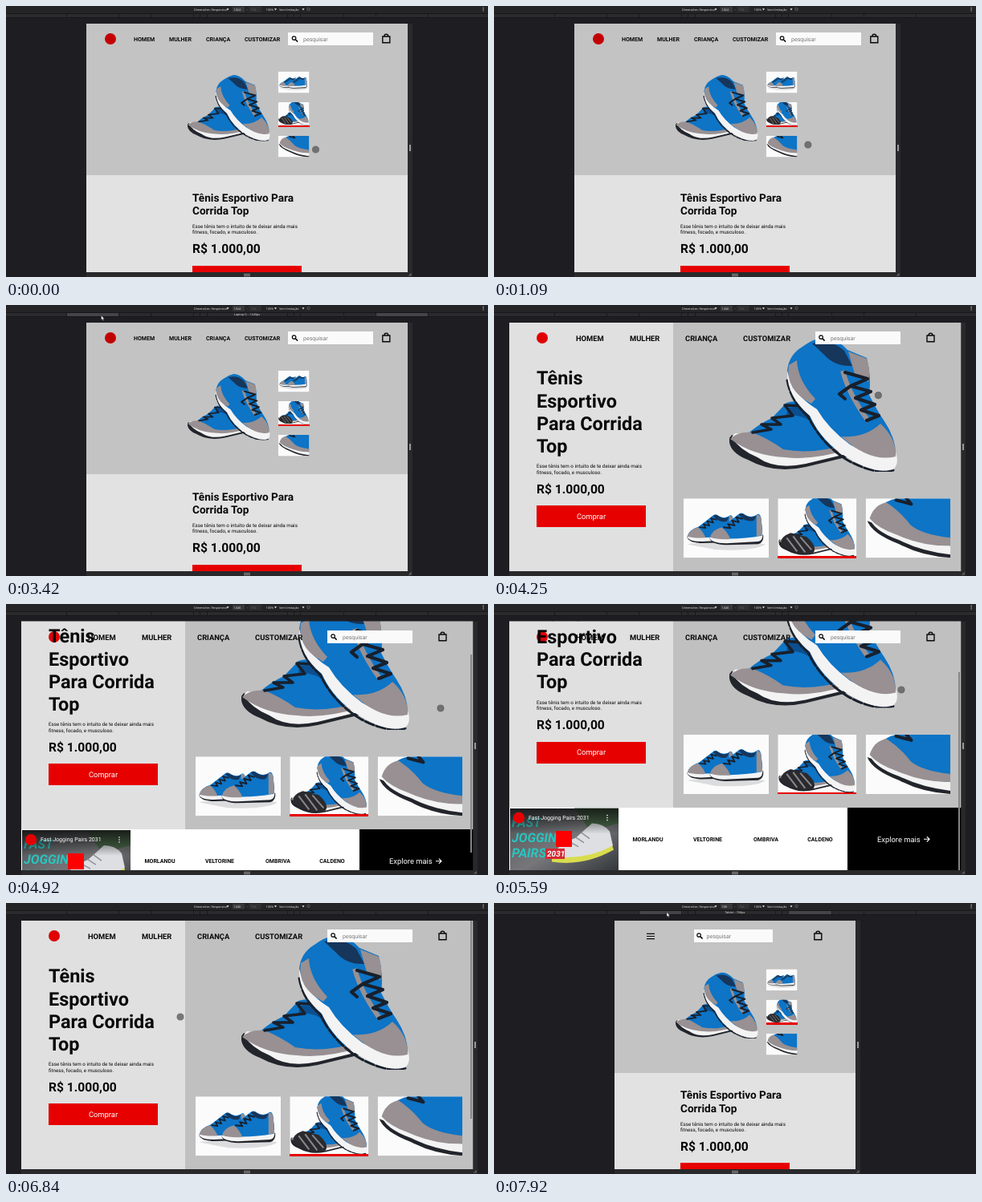
These frames come from a looping animation (600 px wide and 338 px high, 8000 ms). An HTML page:

```html
<!DOCTYPE html>
<html lang="pt">
<head>
<meta charset="utf-8">
<title>Loja responsiva</title>
<style>
  html, body { margin: 0; width: 100%; height: 100%; overflow: hidden; background: #1e1e22; }
  svg { display: block; }
  #stage { width: 100vw; height: 100vh; }
  rect { shape-rendering: crispEdges; }
  text { font-family: Roboto, sans-serif; fill: #080808; white-space: pre; text-rendering: geometricPrecision; }
  .bold { font-weight: 700; }
  .tool { font: 3.75px "Open Sans", sans-serif; fill: #e8e8ea; }
  .dim { fill: #66666a; }
  .white { fill: #fff; }
  .teal { fill: #28c5c0; font-style: italic; }
  .hint { fill: #777; }
  .line { fill: none; stroke: #080808; }
  .lace { fill: none; stroke: #18202c; stroke-linecap: round; stroke-linejoin: round; }
  .blue { fill: #0d74c6; }
  .grey { fill: #989092; }
  .sole { fill: #f3f3f4; }
  .logo { fill: #e60000; mix-blend-mode: darken; }
</style>
</head>
<body>
<svg id="stage" viewBox="0 0 600 338" preserveAspectRatio="none">
  <defs>
    <clipPath id="view"><rect x="18.75" y="21.5" width="562.5" height="310.5"/></clipPath>
    <linearGradient id="shade" x2="0" y2="1">
      <stop stop-color="#111" stop-opacity=".85"/><stop offset="1" stop-color="#111" stop-opacity="0"/>
    </linearGradient>
    <linearGradient id="road" x2="1" y2="1">
      <stop stop-color="#4b5053"/><stop offset=".55" stop-color="#77777a"/><stop offset="1" stop-color="#34383b"/>
    </linearGradient>

    <symbol id="pair" viewBox="293 40 210 168">
      <path fill="#22252b" d="M293 166Q291 183 316 193Q348 211 388 202L446 188V180L380 188Q330 186 296 162Z"/>
      <path class="sole" d="M296 165Q306 181 328 190Q350 206 388 198L446 184L440 168L300 160Z"/>
      <path class="blue" d="M314 162Q330 148 346 141L364 122Q378 117 394 126L446 172Q412 186 375 188Q335 184 314 162Z"/>
      <path fill="#0b4f91" d="M366 128Q388 124 408 142L398 148Q384 136 364 137Z"/>
      <path class="grey" d="M294 167Q304 157 322 159Q342 167 360 180Q396 187 438 174L441 180Q398 194 362 190Q322 188 294 167Z"/>
      <path class="lace" stroke-width="3.600" d="M322 159L345 155L333 149L357 149L346 141L372 138L362 125L384 126"/>
      <path class="lace" stroke-width="3" stroke-dasharray="12 3" d="M365 94Q370 121 391 139Q408 174 441 194Q474 212 497 206"/>
      <path class="sole" d="M365 82Q364 114 393 138Q408 171 441 191Q475 212 497 205Q505 198 500 184L430 155L400 100Z"/>
      <path class="blue" d="M365 82Q367 62 384 52Q396 43 410 40Q425 40 440 56L464 66Q470 90 467 112Q477 132 486 145Q500 166 500 186Q470 191 443 174Q416 154 402 130Q372 112 365 82Z"/>
      <path fill="#16365c" d="M396 48Q420 42 436 57L446 76Q424 77 411 62Z"/>
      <path class="grey" d="M441 58L464 67Q469 82 466 96L449 86ZM367 75L377 69Q378 94 400 117L395 123Q362 106 367 75Z"/>
      <path class="grey" d="M432 164Q462 166 481 148Q501 166 500 189Q468 197 432 164Z"/>
      <path fill="none" stroke="#989092" stroke-width="6" d="M434 82Q442 112 466 145"/>
      <path class="lace" stroke-width="4.200" d="M437 84L465 92L444 101L469 108L450 116L474 124L457 131L479 138L464 144M444 101L430 111L437 117"/>
    </symbol>

    <g id="side">
      <path fill="#22252b" d="M0 31Q2 40 20 40L58 39Q65 37 64 28Z"/>
      <path class="sole" d="M0 31Q2 38 20 38L58 36Q64 35 63 26Z"/>
      <path class="blue" d="M1 31Q2 23 16 18L34 4Q38 0 42 4Q50 9 58 3Q62 4 62 14Q64 26 62 29Q30 35 1 31Z"/>
      <path class="grey" d="M1 31Q3 22 15 19Q22 25 25 33Q10 34 1 31ZM56 4Q62 3 62 14L63 28L56 30Z"/>
      <path fill="#16365c" d="M35 4Q39 1 43 5Q50 9 56 5L53 11Q43 14 35 4Z"/>
      <path class="lace" stroke-width="1.8" d="M17 19L25 20L22 15L30 17L27 11L35 13L32 7L39 9"/>
    </g>
    <symbol id="thumb0" viewBox="0 0 106 74" preserveAspectRatio="none">
      <path fill="#fbfbfb" d="M0 0H106V74H0Z"/>
      <path fill="#dcdcde" d="M4 57Q50 50 102 57Q90 66 40 64Z"/>
      <use href="#side" transform="translate(4 18)scale(.94)"/>
      <use href="#side" transform="translate(32 16)scale(1.05)"/>
    </symbol>
    <symbol id="thumb1" viewBox="0 0 98 72" preserveAspectRatio="none">
      <path fill="#fbfbfb" d="M0 0H98V72H0Z"/>
      <use href="#pair" x="1" y="-5" width="96" height="77"/>
      <path fill="#2a2a2e" d="M4 58Q2 48 16 43L36 48Q50 60 44 68Q25 73 4 58Z"/>
      <path fill="none" stroke="#8b8789" stroke-width="2" d="M11 49L24 66M19 47L34 67M28 48L42 64"/>
    </symbol>
    <symbol id="thumb2" viewBox="0 0 106 74" preserveAspectRatio="none">
      <path fill="#fbfbfb" d="M0 0H106V74H0Z"/>
      <path fill="#22252b" d="M2 28Q8 44 42 57Q70 72 106 74V66Z"/>
      <path class="sole" d="M4 22Q8 40 42 52Q70 66 106 70V52Z"/>
      <path class="blue" d="M10 20Q22 2 40 0H106V59Q72 58 42 44Q18 34 10 20Z"/>
      <path class="grey" d="M5 25Q10 8 26 5Q44 17 56 33Q70 45 106 49V59Q72 60 38 45Q15 37 5 25Z"/>
      <path class="lace" stroke-width="4" d="M38 2L57 7L51 0"/>
    </symbol>

    <g id="lens" class="line" stroke-width="1.2"><circle cx="-.9" cy="-.9" r="2.3"/><path d="M.8 .8L3.6 3.6" stroke-width="1.5"/></g>
    <path id="bag" class="line" stroke-width="1.4" d="M-4.5 -3H4.5V4.7H-4.5ZM-2.3 -3V-4Q-2.3 -5.8 0 -5.8T2.3 -4V-3"/>
  </defs>

  <path fill="#1e1e22" d="M0 0H600V338H0Z"/>
  <path fill="#242427" d="M0 0H600V9H0Z"/>
  <g class="tool">
    <text class="tool" x="234" y="5.6">Dimensões: Responsivo</text>
    <path d="M274.5 3.2h3l-1.5 2.2zM334 3.2h3l-1.5 2.2zM368.5 3.2h3l-1.5 2.2z"/>
    <path d="M282 .8h15v6.6h-15z" fill="#38383b"/>
    <path d="M302.5 .8h15v6.6h-15z" fill="#303033"/>
    <text class="tool" id="size" x="283.5" y="5.6"></text>
    <text class="tool dim" x="299" y="5.6">×</text>
    <text class="tool dim" x="305" y="5.6">704</text>
    <text class="tool" x="323.5" y="5.6">100%</text>
    <text class="tool" x="340" y="5.6">Sem limitação</text>
    <circle cx="376.5" cy="4" r="1.7" fill="none" stroke="#777" stroke-width=".7"/>
    <path d="M593.6 1.8h1v1h-1zm0 1.8h1v1h-1zm0 1.8h1v1h-1z"/>
  </g>
  <g id="ruler"></g>
  <text class="tool" id="label" x="300" y="13.2" text-anchor="middle"></text>
  <g id="frame"></g>
  <g id="pages"></g>
  <circle id="touch" r="4.1" fill="#555" fill-opacity=".75" stroke="#444" stroke-opacity=".6" stroke-width=".8"/>
  <path id="arrow" d="M0 0V5.6L1.3 4.5L2.2 6.5L3.2 6L2.3 4.2H4Z" fill="#fff" stroke="#111" stroke-width=".4"/>
</svg>
<script>
const $ = id => document.getElementById(id);
const PX = 0.390625, RULER = 0.15625, LOOP = 8000, STEPS = 96;
const red = '#e60000';

const text = (x, y, size, str, cls = '', more = '') =>
  `<text x="${x}" y="${y}" font-size="${size}" class="${cls}" ${more}>${str}</text>`;
const rect = (x, y, w, h, fill) =>
  `<rect x="${x}" y="${y}" width="${w}" height="${h}" fill="${fill}"/>`;
const use = (id, x, y, w, h) =>
  `<use href="#${id}" x="${x}" y="${y}" width="${w}" height="${h}"/>`;
const put = (id, x, y) => `<use href="#${id}" transform="translate(${x} ${y})"/>`;
const logo = (x, y) => `<circle class="logo" cx="${x}" cy="${y}" r="7"/>`;

const nav = (xs, y, size) => ['HOMEM', 'MULHER', 'CRIANÇA', 'CUSTOMIZAR']
  .map((word, i) => text(xs[i], y, size, word, 'bold')).join('');
const search = (x, w, iconX, hintX) =>
  rect(x, 33, w, 16.4, '#fafafa') + put('lens', iconX, 41) + text(hintX, 43.9, 7.03, 'pesquisar', 'hint');

const about = (x, y) =>
  text(x, y, 6.25, 'Esse tênis tem o intuito de te deixar ainda mais') +
  text(x, y + 7.5, 6.25, 'fitness, focado, e musculoso.') +
  text(x, y + 31.6, 15.6, 'R$ 1.000,00', 'bold');

// Stacked layout shared by the two narrower widths.
function narrow(px, header, dy) {
  const w = px * PX, x = 300 - w / 2, split = 211 + dy;
  return rect(x, 21.5, w, 310.5, '#e2e2e2') + rect(x, 21.5, w, split - 21.5, '#c3c3c3') + header +
    use('pair', 226, 86 + dy / 2, 103, 82.5) +
    use('thumb0', 338.7, 81.8 + dy, 38.8, 26.6) +
    use('thumb1', 338.7, 120 + dy, 38.8, 28.7) + rect(338.7, 148.6 + dy, 38.8, 2.4, red) +
    use('thumb2', 338.7, 162 + dy, 38.8, 26.6) +
    text(232, 243.6 + dy, 13.6, 'Tênis Esportivo Para', 'bold') +
    text(232, 259.7 + dy, 13.6, 'Corrida Top', 'bold') +
    about(232, 276.7 + dy) +
    rect(232, 323.5 + dy, 136, 8.5 - dy, red);
}

function video() {
  const words = ['FAST', 'JOGGING', 'PAIRS']
    .map((word, i) => text(22, 356 + i * 19, 16, word, 'bold teal')).join('');
  return rect(20, 333, 135, 77, 'url(#road)') +
    '<path fill="#476847" d="M100 333H155V352L120 362Z"/>' + words +
    '<path fill="#d9dc4e" d="M72 392Q108 399 146 377L149 385Q112 406 72 400Z"/>' +
    '<path fill="#dedfe2" d="M72 393Q80 378 102 370L122 352Q136 352 144 362L148 380Q112 399 72 393Z"/>' +
    '<path fill="none" stroke="#8d9298" stroke-width="1.5" d="M94 375L105 381M101 369L112 376M108 363L119 371"/>' +
    rect(64, 383, 24, 13, '#d42a35') + text(66, 393, 10, '2031', 'bold white', 'font-style="italic"') +
    rect(20, 333, 135, 32, 'url(#shade)') + `<circle cx="31" cy="345" r="7" fill="${red}"/>` +
    text(43, 347.4, 7.03, 'Fast Jogging Pairs 2031', 'white') +
    [342, 345, 348].map(y => `<circle cx="141" cy="${y}" r=".8" fill="#fff"/>`).join('') +
    rect(77, 361.5, 20, 20, '#f00');
}

function wide() {
  const title = ['Tênis', 'Esportivo', 'Para Corrida', 'Top']
    .map((line, i) => text(53, 99.4 + i * 28.12, 23.44, line, 'bold')).join('');
  const links = [['MORLANDU', 191.5], ['VELTORINE', 266], ['OMBRIVA', 338.5], ['CALDENO', 406]]
    .map(([name, x]) => text(x, 374, 7.03, name, 'bold', 'text-anchor="middle"')).join('');
  return `<g clip-path="url(#view)"><g id="scroll">` +
    rect(18.75, 21.5, 204.5, 310.5, '#e0e0e0') + rect(223, 21.5, 358.5, 310.5, '#c0c0c0') +
    use('pair', 293, 40, 210, 168) + title + about(53, 203.1) +
    rect(53, 250, 136, 27, red) + text(121, 266.8, 9.375, 'Comprar', 'white', 'text-anchor="middle"') +
    use('thumb0', 236, 241.3, 106, 74) +
    use('thumb1', 353.3, 241.3, 98, 72) + rect(353.3, 313.2, 98, 2.4, red) +
    use('thumb2', 462.7, 241.3, 105.5, 74) +
    rect(18.75, 332, 562.5, 79, '#fff') + video() + links +
    rect(439.5, 332, 142, 79, '#000') + text(477, 375, 9.375, 'Explore mais', 'white') +
    '<path d="M535 371.7H542M538.8 368.5L542 371.7L538.8 374.9" fill="none" stroke="#fff" stroke-width="1.1"/>' +
    `</g>${logo(60, 41)}` + nav([102, 169, 238, 310], 44.9, 9.375) +
    search(399.5, 106.5, 408, 419) + put('bag', 543.5, 41) +
    '<rect id="thumb" x="578.4" width="1.7" height="247" fill="#858585"/></g>';
}

const burger = '<path class="line" stroke-width="1.2" d="M190 38.3H200M190 41.5H200M190 44.7H200"/>';
const pages = {
  1024: narrow(1024, logo(130, 41) + nav([159, 203, 249, 297], 43.9, 7.03) +
    search(351, 106, 359.5, 370) + put('bag', 473.3, 41), 0),
  1440: wide(),
  768: narrow(768, burger + search(249, 98, 256, 264.5) + put('bag', 403.3, 41), 0.8)
};
$('pages').innerHTML = Object.entries(pages)
  .map(([px, body]) => `<g id="page${px}">${body}</g>`).join('');

const presets = [[320, 'Celular P'], [375, 'Celular M'], [425, 'Celular G'], [768, 'Tablet'],
  [1024, 'Laptop'], [1440, 'Laptop G'], [2560, '4K']];
// Widest first, so each narrower preset lies on top.
$('ruler').innerHTML = presets.slice().reverse().map(([px]) => {
  const half = px * RULER;
  return `<rect id="bar${px}" x="${300 - half}" y="9.5" width="${half * 2}" height="4.5" stroke="#18181a" stroke-width=".9"/>`;
}).join('');

function drawFrame(px) {
  const w = px * PX, x = 300 - w / 2, r = x + w;
  $('frame').innerHTML = rect(r, 21.5, 6, 310.5, '#29292c') + rect(x, 332, w + 6, 6, '#29292c') +
    rect(r + 1.8, 172.5, 1, 8, '#999') + rect(r + 3.2, 172.5, 1, 8, '#999') +
    rect(296, 334, 8, 1, '#999') + rect(296, 335.5, 8, 1, '#999') +
    `<path d="M${r + 1.5} 336.5l3-3M${r + 3.2} 336.5l1.5-1.5" stroke="#aaa" stroke-width=".7"/>`;
}

const pointerPath = [[0, 385.5, 179], [920, 385.5, 179], [1600, 422.5, 138.5], [2600, 422.5, 138.5],
  [3150, 118.5, 13], [3720, 118.5, 13], [4420, 541, 130], [4920, 541, 130], [5500, 507, 107],
  [6000, 507, 107], [6750, 217, 142], [7000, 217, 142], [7420, 215, 11.5], [LOOP, 215, 11.5]];
const scrollPath = [[0, 0], [4580, 0], [5140, 78.4], [5950, 78.4], [6550, 0], [LOOP, 0]];

function at(path, t) {
  const i = Math.max(1, path.findIndex(k => k[0] > t));
  const a = path[i - 1], b = path[i];
  const p = (t - a[0]) / (b[0] - a[0]), e = p * p * (3 - 2 * p);
  return a.slice(1).map((v, n) => v + (b[n + 1] - v) * e);
}

let shown;
function draw(t) {
  const px = t < 3600 ? 1024 : t < 7670 ? 1440 : 768;
  if (px !== shown) {
    shown = px;
    for (const key in pages) $('page' + key).style.display = +key === px ? '' : 'none';
    $('size').textContent = px;
    drawFrame(px);
  }
  const [x, y] = at(pointerPath, t), [s] = at(scrollPath, t);
  $('scroll').setAttribute('transform', `translate(0 ${-s})`);
  $('thumb').setAttribute('y', 22 + s * 0.798);
  $('thumb').style.opacity = t > 4580 && t < 7000 ? 1 : 0;

  const inPage = y > 21.5 && Math.abs(x - 300) < px * PX / 2;
  $('touch').style.display = inPage ? '' : 'none';
  $('arrow').style.display = inPage ? 'none' : '';
  $('touch').setAttribute('transform', `translate(${x} ${y})`);
  $('arrow').setAttribute('transform', `translate(${x} ${y})`);

  const hover = y > 9 && y < 14.5 && presets.find(([w]) => Math.abs(x - 300) < w * RULER);
  for (const [w] of presets) $('bar' + w).setAttribute('fill', hover && hover[0] === w ? '#454548' : '#2b2b2e');
  $('label').textContent = hover ? `${hover[1]} – ${hover[0]}px` : '';
}

const start = performance.now();
function tick() {
  const t = (performance.now() - start) % LOOP;
  draw(Math.floor(t * STEPS / LOOP) * LOOP / STEPS);
  requestAnimationFrame(tick);
}
tick();
</script>
</body>
</html>
```
